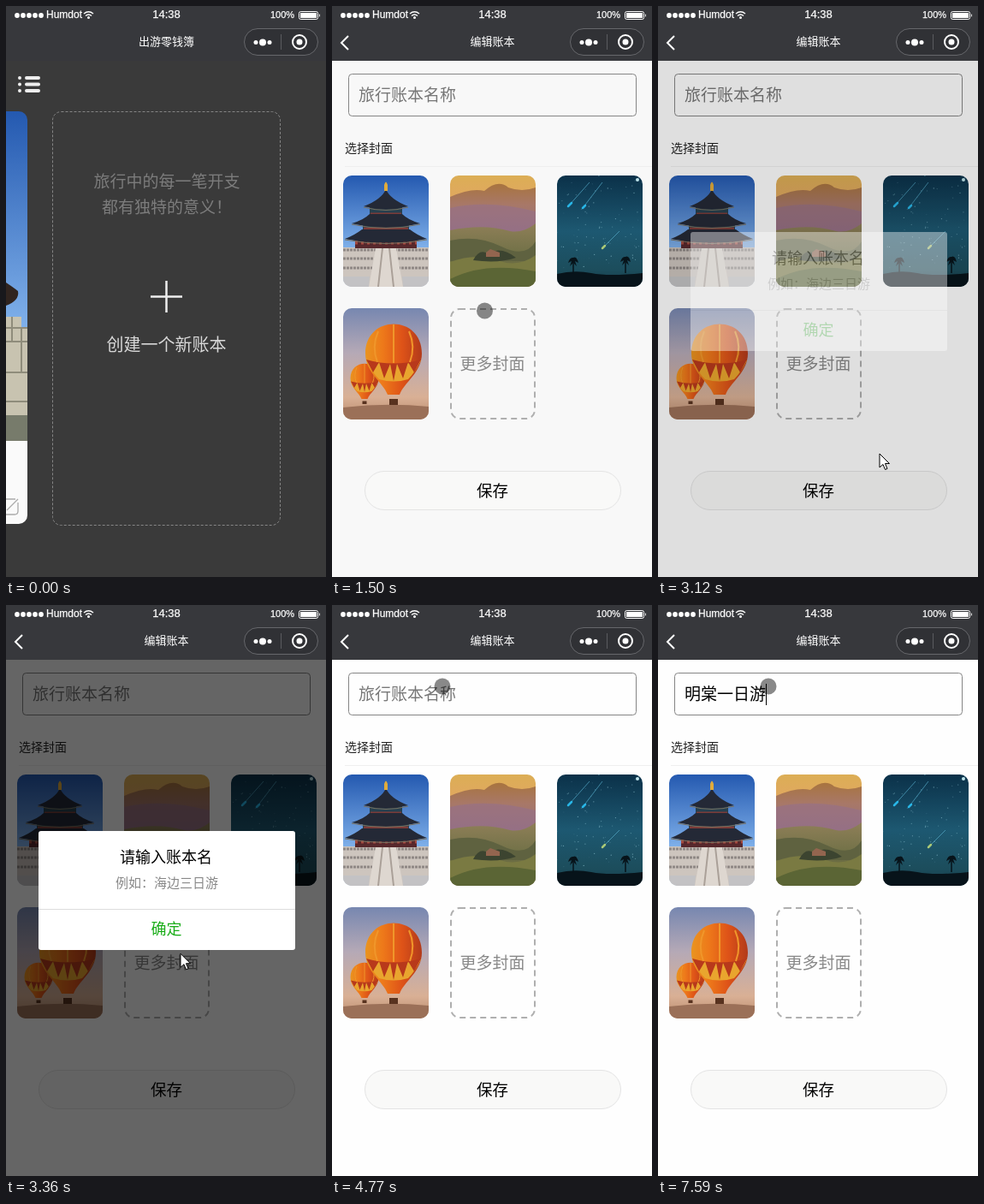
Animation of 374x667 px, one loop 8000 ms. Source, as an HTML page:

```html
<!DOCTYPE html>
<html lang="zh-CN">
<head>
<meta charset="utf-8">
<style>
html, body { margin: 0; width: 100%; height: 100%; overflow: hidden; background: #3a3a3a; }
svg { display: block; width: 374px; height: 667px; font-family: "Noto Sans CJK SC", "Noto Sans CJK", sans-serif; }
.mid { text-anchor: middle; }
.bar { font-family: "Liberation Sans", sans-serif; fill: #fff; stroke: #fff; stroke-width: .25; }
.line { fill: none; }
#letters { font: bold 16px "Liberation Sans", sans-serif; fill: #0b55b5; }
#choices { font-size: 16px; font-weight: 300; fill: #0a84d0; }
#choices .num { font: 13.3px "Liberation Mono", monospace; }
</style>
</head>
<body>
<svg viewBox="0 0 374 667">
  <defs>
    <linearGradient id="sky" x2="0" y2="1"><stop stop-color="#2459b0"/><stop offset=".65" stop-color="#7fb0ea"/><stop offset="1" stop-color="#a8cdf2"/></linearGradient>
    <linearGradient id="dusk" x2="0" y2="1"><stop stop-color="#dcae55"/><stop offset=".2" stop-color="#e0a860"/><stop offset=".5" stop-color="#a17b80"/></linearGradient>
    <linearGradient id="haze" x2="0" y2="1"><stop stop-color="#a8743f"/><stop offset=".4" stop-color="#a87868"/><stop offset="1" stop-color="#94707f"/></linearGradient>
    <linearGradient id="field-tint" x2="0" y2="1"><stop stop-color="#8f7f58"/><stop offset=".45" stop-color="#737248"/><stop offset="1" stop-color="#5b6238"/></linearGradient>
    <linearGradient id="night" x2="0" y2="1"><stop stop-color="#0b3149"/><stop offset=".5" stop-color="#1d5871"/><stop offset=".85" stop-color="#1c4d5c"/><stop offset="1" stop-color="#143844"/></linearGradient>
    <linearGradient id="dawn" x2="0" y2="1"><stop stop-color="#7787b0"/><stop offset=".4" stop-color="#b5a9b6"/><stop offset=".8" stop-color="#d9b095"/><stop offset="1" stop-color="#b98a6c"/></linearGradient>
    <linearGradient id="silk"><stop stop-color="#e9941f"/><stop offset=".3" stop-color="#ee7a1a"/><stop offset=".65" stop-color="#de5318"/><stop offset="1" stop-color="#b23a1a"/></linearGradient>
    <clipPath id="cover"><rect width="100" height="130" rx="10"/></clipPath>
    <clipPath id="card"><rect x="-240" y="123" width="265" height="482" rx="10"/></clipPath>
    <g id="balloon">
      <path d="M-33-2C-33-48 33-48 33-2C33 20 12 32 7 46H-7C-12 32-33 20-33-2Z" fill="url(#silk)"/>
      <path d="M-32 6Q0 15 32 6Q25 20 17 28Q0 33-17 28Q-25 20-32 6Z" fill="#e9a52e"/>
      <path d="M-32 5L-24 20L-17 8L-11 27L-4 10L0 30L4 10L11 27L17 8L24 20L32 5Q0 14-32 5Z" fill="#b8391b"/>
      <path d="M-18-28Q-26-10-19 8M0-36V9M18-28Q26-10 19 8" class="line" stroke="#f0962a" stroke-width="2"/>
      <path d="M-5 51H5V58H-5Z" fill="#58321f"/>
    </g>
    <g id="palm">
      <path d="M0 0V16" stroke="#07131a" stroke-width="1.5"/>
      <path d="M-6 3Q-4-4 0-3Q4-5 6 3L2 1L4 7L0 3L-4 7L-2 1Z" fill="#07131a"/>
    </g>
  </defs>

  <g id="home">
    <rect width="374" height="667" fill="#3a3a3a"/>
    <g stroke="#eee" stroke-width="4" stroke-linecap="round"><path d="M16 84h0M24 84H38M16 91.500h0M24 91.500H38M16 99h0M24 99H38"/></g>
    <g clip-path="url(#card)">
      <rect y="123" width="25" height="385" fill="url(#sky)"/>
      <path d="M0 323Q9 329 14 333Q16 344 0 350Z" fill="#30241f"/>
      <path d="M0 363H18V376H25V508H0Z" fill="#c8c3b0"/>
      <path d="M0 376H25M0 392H25M0 428H25M0 462H25M7 363V392M18 376V428" stroke="#8f8c7b" stroke-width="2"/>
      <path d="M0 478H25V508H0Z" fill="#777b6b"/>
      <rect y="508" width="25" height="97" fill="#fafafa"/>
      <path d="M0 576H11M14 580V590Q14 594 10 594H0M1 589L14 576" class="line" stroke="#aaa" stroke-width="1.300"/>
    </g>
    <rect x="54.500" y="123.500" width="266" height="483" rx="10" class="line" stroke="#858585" stroke-dasharray="3 2"/>
    <g class="mid" font-size="19" fill="#7c7c7c"><text x="188" y="212">旅行中的每一笔开支</text><text x="188" y="242">都有独特的意义！</text></g>
    <path d="M169 339.500H206M187.500 321V358" stroke="#eee" stroke-width="2.500"/>
    <text class="mid" x="187.500" y="403" font-size="20" fill="#d8d8d8">创建一个新账本</text>
  </g>

  <g id="page">
    <rect id="paper" y="64" width="374" height="603"/>
    <rect x="19.500" y="79.500" width="336" height="49" rx="4" class="line" stroke="#858585"/>
    <text id="field" x="31" y="111" font-size="19"></text>
    <path id="caret" d="M0 92V117" stroke="#000"/>
    <text x="15" y="171" font-size="14" fill="#222">选择封面</text>
    <path d="M15 187.500H374" stroke="#efefef"/>

    <g transform="translate(13 198)" clip-path="url(#cover)">
      <rect width="100" height="130" fill="url(#sky)"/>
      <path d="M0 84H100V130H0Z" fill="#cdc5be"/>
      <path d="M0 87H100M0 97H100M0 108H100" stroke="#8f8885" stroke-width="3" stroke-dasharray="3 1"/>
      <path d="M14 72H86V85H14Z" fill="#57282c"/>
      <path d="M14 78H86" stroke="#a6493f" stroke-width="5" stroke-dasharray="3 4"/>
      <path d="M23 54H77V66H23ZM31 36H69V49H31Z" fill="#26404f"/>
      <path d="M24 62H76M32 45H68" stroke="#7c3b38" stroke-width="3"/>
      <path d="M50 16Q45 28 24 36Q50 43 76 36Q55 28 50 16ZM31 45Q24 52 10 56Q50 65 90 56Q76 52 69 45ZM22 63Q13 70 2 74Q50 83 98 74Q87 70 78 63Z" fill="#242936"/>
      <path d="M24 37Q50 44 76 37M10 57Q50 66 90 57M2 75Q50 84 98 75" class="line" stroke="#77705f"/>
      <path d="M48 18V11Q50 4 52 11V18Z" fill="#e0ab3c"/>
      <path d="M38 85H62L70 130H30Z" fill="#ded7d0"/>
      <path d="M46 85L41 130M54 85L59 130" stroke="#aaa098" stroke-width="2"/>
      <path d="M0 118H31L30 130H0ZM69 118H100V130H70Z" fill="#c3c2c4"/>
    </g>
    <g transform="translate(138 198)" clip-path="url(#cover)">
      <rect width="100" height="130" fill="url(#dusk)"/>
      <path d="M0 25Q25 14 40 18Q56 4 68 14Q84 20 100 14V70H0Z" fill="url(#haze)"/>
      <path d="M0 38Q45 28 100 42V68H0Z" fill="#94708a" opacity=".6"/>
      <path d="M0 64Q40 56 70 65Q85 68 100 56V130H0Z" fill="url(#field-tint)"/>
      <path d="M0 76Q32 69 60 83T100 77V100H0Z" fill="#5f6240"/>
      <path d="M0 101Q30 90 55 99T100 93V130H0Z" fill="#7a7a42"/>
      <path d="M0 121Q40 100 100 112V130H0Z" fill="#5b6535"/>
      <path d="M27 99Q34 85 44 91Q60 82 77 96Q57 103 27 99Z" fill="#3c4430"/>
      <path d="M42 90L47 86L58 90V95H42Z" fill="#93654f"/>
    </g>
    <g transform="translate(263 198)" clip-path="url(#cover)">
      <rect width="100" height="130" fill="url(#night)"/>
      <g id="stars" fill="#9bd0de"></g>
      <path d="M38 8L13 36M53 8L30 38M73 65L53 85" stroke="#55a9c7" opacity=".7"/>
      <path d="M17 32L13 36M33 35L30 38" stroke="#28b5e6" stroke-width="2.500" stroke-linecap="round"/>
      <path d="M56 82L53 85" stroke="#a9c878" stroke-width="2.500" stroke-linecap="round"/>
      <circle cx="94" cy="5" r="2" fill="#bfe5ec"/>
      <path d="M0 115Q20 110 40 114T100 114V130H0Z" fill="#07131a"/>
      <use href="#palm" x="19" y="99"/><use href="#palm" x="80" y="98"/>
    </g>
    <g transform="translate(13 353)" clip-path="url(#cover)">
      <rect width="100" height="130" fill="url(#dawn)"/>
      <path d="M0 116Q50 110 100 115V130H0Z" fill="#9b7058"/>
      <use href="#balloon" transform="translate(25 83) scale(.5)"/>
      <use href="#balloon" transform="translate(59 55)"/>
    </g>
    <rect x="139" y="354" width="98" height="128" rx="10" class="line" stroke="#afafaf" stroke-width="2" stroke-dasharray="7 5"/>
    <text class="mid" x="187.500" y="425" font-size="19" fill="#888">更多封面</text>
    <rect x="38.500" y="543.500" width="299" height="45" rx="22.500" fill="#f9f9f8" stroke="#e4e4e4"/>
    <text class="mid" x="187.500" y="573" font-size="18.500">保存</text>
  </g>

  <rect id="mask" y="64" width="374" height="603"/>
  <g id="dialog">
    <rect id="panel" x="38" width="300" rx="3" fill="#fff"/>
    <g id="message" class="mid" font-size="18">
      <text x="187" y="301">请输入账本名</text>
      <text x="188" y="330" font-size="15" fill="#888">例如：海边三日游</text>
      <path d="M38 355.500H338" stroke="#ddd"/>
      <text x="187.500" y="385" fill="#1aad19">确定</text>
    </g>
  </g>

  <rect width="374" height="64" fill="#37383c"/>
  <g fill="#fff">
    <path d="M13 11h0M20 11h0M27 11h0M34 11h0M41 11h0" stroke="#fff" stroke-width="5.800" stroke-linecap="round"/>
    <text class="bar" x="47" y="14" font-size="12">Humdot</text>
    <path d="M91 9Q96.500 4.500 102 9M93 11.500Q96.500 8.500 100 11.500" class="line" stroke="#fff" stroke-width="1.500"/>
    <circle cx="96.500" cy="13.500" r="1.500"/>
    <text class="bar mid" x="187.500" y="14" font-size="13">14:38</text>
    <text class="bar" x="309" y="14" font-size="11">100%</text>
    <rect x="342.500" y="6.500" width="22" height="9" rx="2" class="line" stroke="#fff"/>
    <path d="M344 8H363V14H344ZM366 9Q368 11 366 13Z"/>
    <text id="title" class="mid" x="187.500" y="46" font-size="13" font-weight="500"></text>
    <path id="back" d="M19 35L11 43L19 51" class="line" stroke="#fff" stroke-width="2"/>
    <rect x="278.500" y="26.500" width="86" height="31" rx="15.500" fill="#303135" stroke="#66676b"/>
    <path d="M321.500 33V51" stroke="#5b5c60"/>
    <circle cx="292" cy="42.500" r="2.500"/><circle cx="300" cy="42.500" r="4"/><circle cx="308" cy="42.500" r="2.500"/>
    <circle cx="343" cy="42" r="8" class="line" stroke="#fff" stroke-width="2"/><circle cx="343" cy="42" r="3.500"/>
  </g>

  <g id="touch"><circle r="9.500" fill-opacity=".46"/></g>
  <path id="arrow" d="M0 0V16L4 12.500L6.500 18.500L9 17.500L6.500 11.500H11.500Z" fill="#fff" stroke="#000"/>

  <g id="ime">
    <rect id="box" x=".5" y="116.500" height="55" fill="#fff" stroke="#aaa"/>
    <text id="letters" x="11" y="137"></text>
    <path id="bar" stroke="#0b55b5" d="M0 122V140"/>
    <path id="rule" stroke="#b9d3e2"/>
    <text id="choices" y="163"></text>
    <g id="tools" class="line" stroke="#e2532f" stroke-width="2">
      <path d="M-47 154L-51 158L-47 162" stroke="#ccc"/><path d="M-35 153L-30 158L-35 163M-20 156L-15.500 160.500L-11 156"/>
      <rect x="-30" y="118" width="28" height="28" rx="4" fill="#f08c6c" stroke="none" transform="rotate(-8 -16 132)"/>
    </g>
  </g>
</svg>
<script>
const $ = id => document.getElementById(id);
const set = (id, attrs) => { for (const k in attrs) $(id).setAttribute(k, attrs[k]); };
const show = (id, on) => { $(id).style.display = on ? "" : "none"; };
const ramp = (t, a, b) => Math.min(1, Math.max(0, (t - a) / (b - a)));

// time, x, y of the pointer
const path = [
  [90, 323, 231], [540, 193, 437], [750, 193, 437], [1140, 178.5, 356], [1770, 178.5, 356],
  [2040, 99, 106], [2640, 99, 106], [2880, 239, 571], [3030, 239, 571], [3120, 259, 523],
  [3450, 192, 382], [3640, 188, 378], [3810, 180, 233], [4140, 129, 95]
];

// time, typed letters, suggestions
const typing = [
  [4800, "m", "吗 没 们 么 买"], [4890, "mi", "米 密 迷 秘 蜜"],
  [4980, "min", "民 敏 闽 皿 抿"], [5160, "ming", "明 名 命 鸣 铭"],
  [5310, "mingt", "明天 明堂 名堂 明 名"], [5400, "mingta", "明塔 名塔 明他 明 名"],
  [5520, "mingtan", "明坛 名坛 明谈 明 名"], [5640, "mingtang", "明棠 名堂 明堂 明 名"],
  [5940, ""],
  [6270, "y", "有 页 要 也 用"], [6750, "yi", "一 以 已 亿 意"],
  [6930, "yir", "一人 易燃 一日 一 以"], [7110, "yiri", "一日 异日 一 以 已"],
  [7230, "yiriy", "一日游 一日 一 以 已"], [7410, "yiriyou", "一日游 一日 一 以 已"],
  [7560, ""]
];

let seed = 7;
const rand = () => (seed = seed * 16807 % 2147483647) / 2147483647;
for (let i = 0; i < 90; i++)
  $("stars").innerHTML += `<circle cx="${rand() * 100}" cy="${rand() * 108}" r=".6" opacity="${rand() * 0.7}"/>`;

function drawPointer(t) {
  const i = path.findIndex(p => p[0] > t);
  const b = path.at(i), a = i < 0 ? b : path[Math.max(0, i - 1)];
  const k = ramp(t, a[0], b[0] + (a === b));
  const e = k * k * (3 - 2 * k);
  const move = { transform: `translate(${a[1] + (b[1] - a[1]) * e} ${a[2] + (b[2] - a[2]) * e})` };
  const arrow = t >= 3090 && t < 3960;
  set("touch", move);
  set("arrow", move);
  show("touch", t >= 90 && !arrow);
  show("arrow", arrow);
}

function drawDialog(t) {
  const closing = t >= 3670;
  const k = closing ? 1 - ramp(t, 3670, 3970) : ramp(t, 3060, 3360);
  set("mask", { opacity: 0.6 * k });
  set("dialog", { opacity: Math.min(1, k * (closing ? 1.5 : 2)) });
  set("panel", closing ? { y: 303, height: 62 } : { y: 264, height: 139 });
  set("message", { opacity: Math.min(1, 3 * k) });
  show("message", !closing);
}

let shown;
function drawIme(t) {
  const entry = typing.findLast(e => e[0] <= t);
  show("ime", entry && entry[1]);
  if (!entry || !entry[1] || entry === shown) return;
  shown = entry;
  const words = entry[2].split(" ");
  let x = 11;
  $("choices").innerHTML = words.map((word, i) => {
    const part = `<tspan x="${x}" class="num"${i ? "" : ' fill="#e0282e"'}>${i + 1}.</tspan>` +
      `<tspan x="${x + 16}"${i ? "" : ' fill="#e0282e"'}>${word}</tspan>`;
    x += 29 + 16 * word.length;
    return part;
  }).join("");
  const width = x + 56;
  set("ime", { transform: `translate(${t < 6000 ? 31 : 69})` });
  set("box", { width: width - 1 });
  set("rule", { d: `M9 143.500H${width - 32}` });
  set("tools", { transform: `translate(${width})` });
  $("letters").textContent = entry[1];
  set("bar", { transform: `translate(${11.5 + $("letters").getComputedTextLength()})` });
}

function draw() {
  const t = performance.now() % 8000;
  const opened = t >= 1290;
  set("page", { transform: `translate(${374 * (1 - ramp(t, 1290, 1500))})` });
  show("page", opened);
  show("back", opened);
  $("title").textContent = opened ? "编辑账本" : "出游零钱簿";
  set("paper", { fill: t < 3030 ? "#f8f8f8" : "#fefefe" });

  const name = t < 5940 ? "" : t < 7560 ? "明棠" : "明棠一日游";
  $("field").textContent = name || "旅行账本名称";
  set("field", { fill: name ? "#000" : "#777" });
  set("caret", { transform: `translate(${32.5 + 19 * name.length - (name ? 1 : 0)})` });
  show("caret", t >= 2250 && t < 2640 || t >= 4320 && t < 4770 || t >= 4800);

  drawDialog(t);
  drawPointer(t);
  drawIme(t);
  requestAnimationFrame(draw);
}
draw();
</script>
</body>
</html>
```
